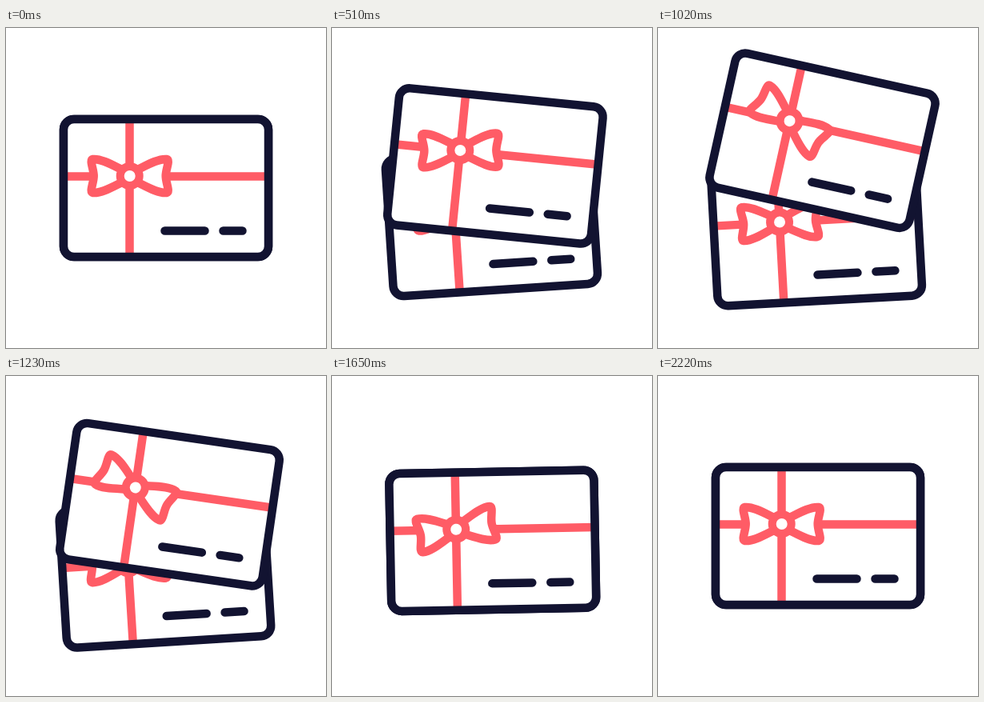
These frames come from a looping animation (400 by 400 pixels, 2.34 s). An HTML page:

```html
<!DOCTYPE html>
<html lang="en">
<head>
<meta charset="utf-8">
<title>Gift cards</title>
<style>
  html, body { margin: 0; width: 100%; height: 100%; overflow: hidden; background: #fff; }
  svg { display: block; width: 100vw; height: 100vh; }
  .ink { stroke: #121331; }
  .ribbon { stroke: #ff5c66; }
</style>
</head>
<body>
<svg viewBox="0 0 400 400" fill="#fff" stroke-width="10.5" stroke-linecap="round" stroke-linejoin="round">
  <defs>
    <g id="card">
      <rect x="-128" y="-86" width="256" height="172" rx="13"/>
      <path class="ribbon" stroke-linecap="butt" d="M-128 -14.5H128M-45.5 -86V86"/>
      <rect class="ink" fill="none" x="-128" y="-86" width="256" height="172" rx="13"/>
      <path class="ink" d="M-1.5 53.5H48.5M71.5 53.5H95.5"/>
    </g>
    <path id="wing" class="ribbon" d="M-10 -8C-22 -14 -36 -22 -46 -21C-51 -20 -45 -9 -45 0C-45 9 -51 20 -46 21C-36 22 -22 14 -10 8"/>
    <g id="bow">
      <use href="#wing"/>
      <use href="#wing" transform="scale(-1 1)"/>
      <circle class="ribbon" r="12" stroke-width="10"/>
    </g>
  </defs>
  <g id="back"><use href="#card"/><use href="#bow" x="-45.3" y="-15"/></g>
  <g id="front"><use href="#card"/><use id="swing" href="#bow"/></g>
</svg>
<script>
const LOOP = 2340, END = 2220, STEP = 30;

// Easing along a cubic Bezier with control points (a, 0) and (b, 1).
const bezier = (a, b) => x => {
  let lo = 0, hi = 1, s = 0.5;
  for (let i = 0; i < 24; i++) {
    s = (lo + hi) / 2;
    const at = 3 * a * s * (1 - s) ** 2 + 3 * b * s * s * (1 - s) + s ** 3;
    if (at < x) lo = s; else hi = s;
  }
  return s * s * (3 - 2 * s);
};
const smooth = bezier(1 / 3, 2 / 3);
const burst = bezier(0.19, 0.19);
const gather = bezier(0.8, 0.8);

// Keys: [time, values, easing towards this key]
const rest = [200, 200, 0], dip = [201.5, 221, -4.7], hop = [200, 188.7, 3];
const cardTrack = spread => [
  [0, rest],
  [330, dip, smooth],
  [900, spread, burst],
  [1470, dip, gather],
  [1845, hop, smooth],
  [2160, rest, smooth],
];
const frontTrack = cardTrack([205.6, 138.5, 13]);
const backTrack = cardTrack([198, 256, -3.1]);
const bowTrack = [
  [0, [0]],
  [420, [-10], smooth],
  [850, [24], smooth],
  [1150, [24], smooth],
  [1600, [-10], smooth],
  [1900, [6], smooth],
  [END, [0], smooth],
];

function sample(track, t) {
  const i = track.findIndex(key => key[0] > t);
  if (i < 0) return track[track.length - 1][1];
  const [t0, from] = track[i - 1], [t1, to, ease] = track[i];
  const k = ease((t - t0) / (t1 - t0));
  return from.map((v, n) => v + (to[n] - v) * k);
}

const byId = id => document.getElementById(id);
const front = byId('front'), back = byId('back'), swing = byId('swing');

function place(node, [x, y, angle]) {
  node.setAttribute('transform', `translate(${x} ${y}) rotate(${angle})`);
}

function draw(now) {
  const t = Math.min(END, Math.floor((now % LOOP) / STEP) * STEP);
  place(front, sample(frontTrack, t));
  place(back, sample(backTrack, t));
  place(swing, [-45.3, -15, ...sample(bowTrack, t)]);
}

let start;
function tick(now) {
  start ??= now;
  draw(now - start);
  requestAnimationFrame(tick);
}
draw(0);
requestAnimationFrame(tick);
</script>
</body>
</html>
```
